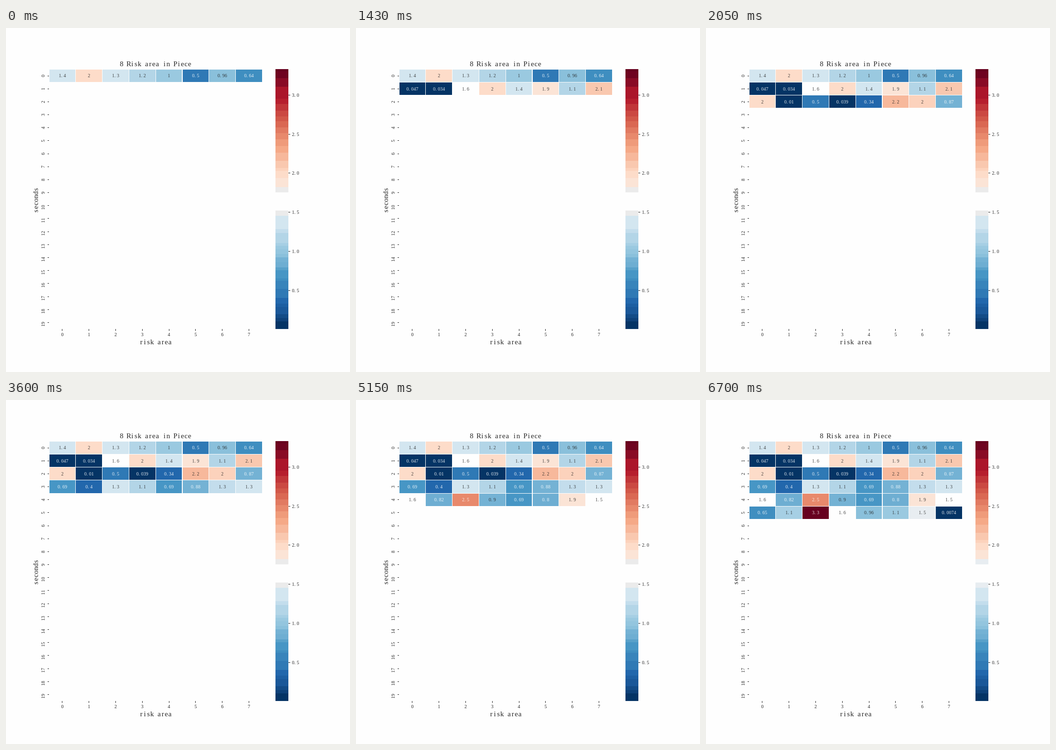
Write an HTML page that moves like this. It is 720 px wide and 720 px high and loops after 8000 ms.

```html
<!DOCTYPE html>
<html lang="en">
<head>
<meta charset="utf-8">
<title>Risk area heatmap</title>
<style>
  html, body { margin: 0; width: 100%; height: 100%; overflow: hidden; background: #fefefe; }
  svg { display: block; width: 100vw; height: 100vh; }
  text { font-family: "Liberation Serif", "Noto Serif", serif; text-anchor: middle; white-space: pre; }
  .cells text { fill-opacity: 0.85; }
</style>
</head>
<body>
<svg id="stage" viewBox="0 0 720 720"></svg>
<script>
const stage = document.getElementById('stage');
const LOOP = 8000, FIRST = 500, STEP = 1550;
const INK = '#262626', PAPER = '#fefefe';
const LEFT = 90, TOP = 86.4, COL = 55.8, ROW = 27.18, BOTTOM = 630;
const BAR_X = 564, BAR_W = 27, UNIT = 163.5;

// Colour bar bands: top edge and colour, from high values to low.
const bands = [
  [86, '#67001f'], [91, '#6f0320'], [105, '#890b25'], [123, '#ab162a'],
  [148, '#b61f2e'], [159, '#c13639'], [173, '#cb4942'], [185, '#d25849'],
  [195, '#da6853'], [208, '#e17a61'], [220, '#e8896c'], [233, '#ef9b7a'],
  [247, '#f5a987'], [261, '#f7b89b'], [278, '#f9c8af'], [293, '#fcd2bc'],
  [299, '#fddcc9'], [314, '#fbe4d6'], [333, '#ebebeb'], [344, PAPER],
  [382, '#ebebeb'], [393, '#d3e6f0'], [421, '#c3ddec'], [429, '#b3d5e7'],
  [450, '#a6cfe4'], [456, '#9ac9e0'], [463, '#93c5de'], [473, '#8ac0db'],
  [480, '#74b2d4'], [490, '#6eaed2'], [501, '#59a1ca'], [507, '#4796c5'],
  [524, '#3f8ec0'], [529, '#3884bb'], [546, '#2f79b5'], [565, '#2267ac'],
  [577, '#1d5fa2'], [584, '#1a5899'], [599, '#134c87'], [607, '#0e4179'],
  [614, '#053465']
];

// Values are labelled with two significant digits.
const data = [
  [1.4, 1.97, 1.34, 1.2, 1.04, 0.5, 0.96, 0.64],
  [0.047, 0.034, 1.6, 1.98, 1.4, 1.9, 1.13, 2.1],
  [1.97, 0.01, 0.5, 0.039, 0.34, 2.2, 2.04, 0.87],
  [0.69, 0.4, 1.34, 1.14, 0.69, 0.88, 1.26, 1.34],
  [1.6, 0.82, 2.5, 0.9, 0.69, 0.8, 1.9, 1.53],
  [0.65, 1.08, 3.33, 1.6, 0.96, 1.06, 1.49, 0.0074]
];

const barY = v => 549 - (v - 0.5) * UNIT;
const colorOf = v => bands.filter(([y]) => y <= barY(v)).pop()[1];
const label = v => String(Number(v.toPrecision(2)));
const isDark = v => v < 0.895 || v > 2.45;
const snap = v => Math.floor(v + 0.02);

function add(parent, tag, attrs) {
  const node = document.createElementNS('http://www.w3.org/2000/svg', tag);
  for (const key in attrs) node.setAttribute(key, attrs[key]);
  return parent.appendChild(node);
}

function rect(parent, x, y, width, height, fill) {
  return add(parent, 'rect', { x, y, width, height, fill });
}

// Half-em pitch for every character; the point sits left in its slot.
function mono(parent, str, cx, baseline, size, fill = INK, turn = false) {
  const x = [...str].map((ch, i) => {
    const start = turn ? 0 : cx;
    return start + (i - (str.length - 1) / 2) * size / 2 - (ch === '.' ? size * 0.12 : 0);
  });
  const attrs = { x: x.join(' '), y: turn ? 0 : baseline, 'font-size': size, fill };
  if (turn) attrs.transform = `translate(${cx} ${baseline}) rotate(-90)`;
  add(parent, 'text', attrs).textContent = str;
}

// Whole pixels strictly between two grid lines, so the lines stay clear.
function span(origin, size, i) {
  const from = Math.floor(origin + i * size + 0.001) + 1;
  const to = Math.ceil(origin + (i + 1) * size - 0.001) - 1;
  return [from, to - from];
}

rect(stage, 0, 0, 720, 720, PAPER);
mono(stage, '8 Risk area in Piece', 313.2, 80, 15);
mono(stage, 'risk area', 313.2, 662, 15);
mono(stage, 'seconds', 67, 360.5, 15, INK, true);

for (let c = 0; c < 8; c++) {
  const x = LEFT + (c + 0.5) * COL;
  rect(stage, snap(x), BOTTOM, 1, 4, INK);
  mono(stage, String(c), x, 645, 10);
}
for (let r = 0; r < 20; r++) {
  const y = TOP + (r + 0.5) * ROW;
  rect(stage, 87, snap(y), 3, 1, INK);
  mono(stage, String(r), 80.5, y + (r > 9 ? 3.7 : 0.3), 10, INK, true);
}

const bandRects = bands.map(([y, fill], i) => {
  const end = i + 1 < bands.length ? bands[i + 1][0] : BOTTOM;
  return rect(stage, BAR_X, y, BAR_W, end - y, fill);
});
const greyBands = bandRects.filter((_, i) => bands[i][1] === '#ebebeb');
for (let v = 0.5; v <= 3; v += 0.5) {
  rect(stage, 591, snap(barY(v)), 4, 1, INK);
  mono(stage, v.toFixed(1), 606, barY(v) + 3.7, 10);
}

const rows = data.map((values, r) => {
  const group = add(stage, 'g', { class: 'cells' });
  const [y, height] = span(TOP, ROW, r);
  values.forEach((v, c) => {
    const [x, width] = span(LEFT, COL, c);
    const fill = colorOf(v) === '#ebebeb' ? '#e8edf1' : colorOf(v);
    rect(group, x, y, width, height, fill);
    mono(group, label(v), LEFT + (c + 0.5) * COL, TOP + (r + 0.5) * ROW + 3.5, 10,
      isDark(v) ? '#fff' : INK);
  });
  return group;
});

function render(time) {
  const shown = 1 + Math.floor((time % LOOP + STEP - FIRST) / STEP);
  rows.forEach((row, r) => row.setAttribute('visibility', r < shown ? 'visible' : 'hidden'));
  const grey = shown >= rows.length ? '#e8edf1' : '#ebebeb';
  greyBands.forEach(band => band.setAttribute('fill', grey));
}

const start = performance.now();
function tick() {
  render(performance.now() - start);
  requestAnimationFrame(tick);
}
tick();
</script>
</body>
</html>
```
